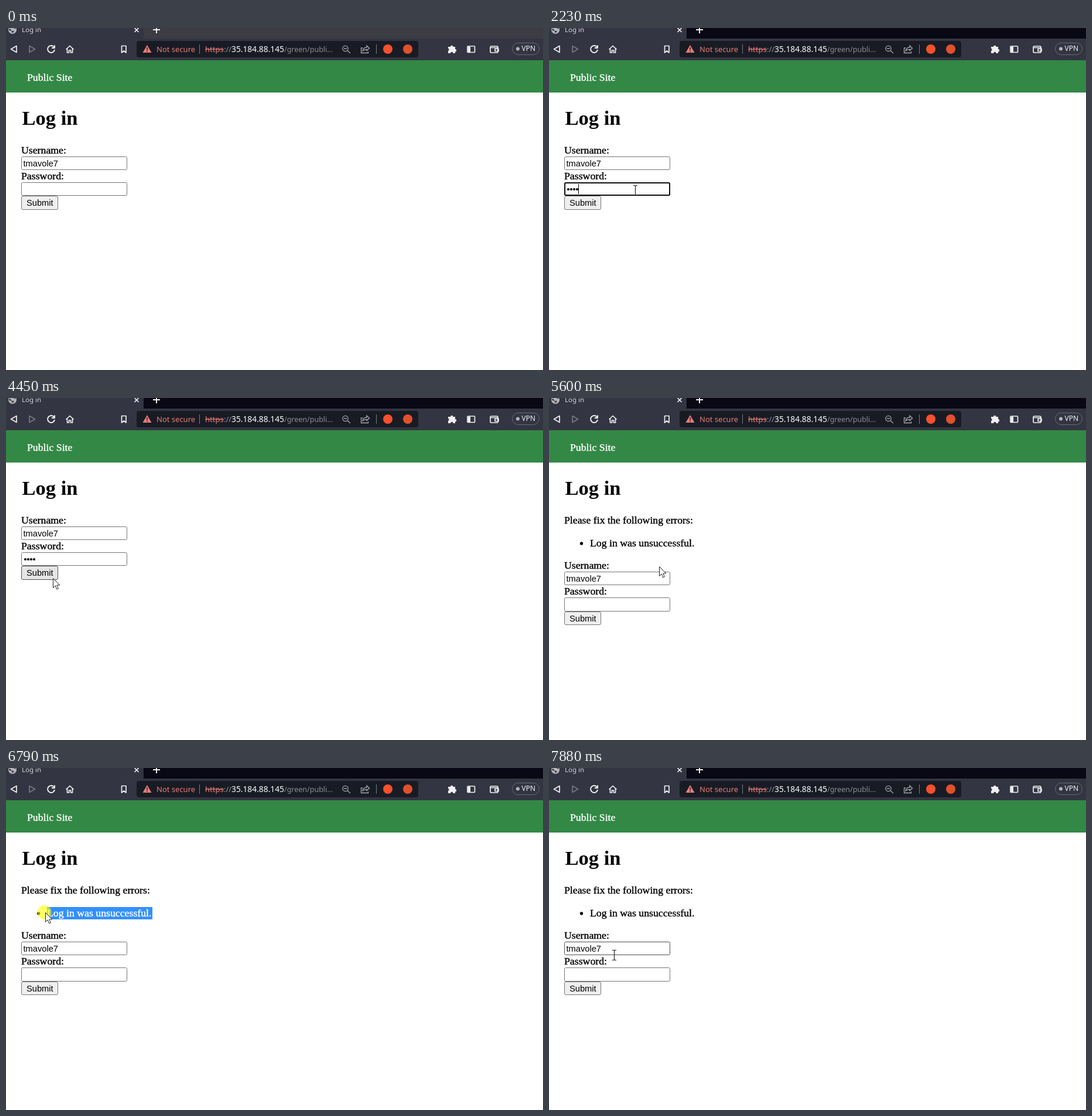
Animation, 917 px wide and 583 px high, one loop 8000 ms. Source, as an HTML page:

```html
<!DOCTYPE html>
<html lang="en">
<head>
<meta charset="utf-8">
<title>Log in</title>
<style>
  html, body { margin: 0; width: 100%; height: 100%; overflow: hidden; background: #fff; }
  svg { display: block; }
  text { white-space: pre; }
  .ui { font-family: "Noto Sans", sans-serif; font-size: 13px; }
  .page { font-family: "Liberation Serif", serif; font-size: 17.75px; stroke-width: .4px; }
  .dark { fill: #000; stroke: #000; }
  .light { fill: #fff; stroke: #fff; }
  .form { font-family: "Liberation Sans", sans-serif; font-size: 14.667px; }
  .field { fill: #fff; stroke: #767676; }
  .line { fill: none; stroke: #f0f0f3; stroke-width: 1.7; }
</style>
</head>
<body>
<svg width="917" height="583" viewBox="0 0 917 583">
  <defs>
    <clipPath id="selectionClip"><rect id="clipBox" y="237" height="21"/></clipPath>
  </defs>

  <!-- tab strip -->
  <rect id="strip" width="917" height="18"/>
  <path d="M0 0H235V18H0z" fill="#333542"/>
  <g id="globe">
    <circle cx="11" cy="3" r="7" fill="#b4b5ba"/>
    <path d="M5 1q3 0 4 2.500t4 1l.500 2-3 2-1-3.500-4-1zM12-3q0 4 4.500 4.500V-3z" fill="#333542"/>
  </g>
  <path id="spinner" d="M11-3A6 6 0 1 1 5 3" fill="none" stroke="#b4b5ba" stroke-width="2"/>
  <text class="ui" x="27" y="7" fill="#d5d6db" style="font-size:11.5px">Log in</text>
  <path class="line" d="M219.500 0l7 7m0-7l-7 7"/>
  <path class="line" d="M251 3h12M257-3v12" style="stroke-width:2"/>

  <!-- toolbar -->
  <rect y="18" width="917" height="37" fill="#333542"/>
  <g class="line" stroke-linejoin="round">
    <path d="M18 30.500L8.500 36 18 41.500z"/>
    <path d="M40 30.500L49.500 36 40 41.500z" stroke="#777985" style="stroke:#777985"/>
    <path d="M82 32.500A6 6 0 1 0 83 37M83 29.500v4.500h-5" stroke-width="2"/>
    <path d="M102.500 36.500L109 30.500l6.500 6M104.500 35v7h3v-4h3v4h3v-7"/>
    <path d="M197.500 30.500h7.500V42l-3.750-3-3.750 3z"/>
    <rect x="788" y="31" width="12.500" height="10.500" rx="1"/>
    <path d="M789 32h4v9h-4z" fill="#f0f0f3" stroke="none"/>
    <rect x="827" y="31" width="13" height="11" rx="2"/>
    <path d="M828 33.500h13M841 35.500h-6v4h6z"/>
  </g>
  <path d="M755 32h4a2.200 2.200 0 1 1 4.400 0H767v4a2.200 2.200 0 1 1 0 4.400V43h-3.500a2.200 2.200 0 0 0-4.400 0H755v-4a2.200 2.200 0 0 0 0-4.200z" fill="#f0f0f3"/>
  <rect x="223" y="22" width="481" height="28" rx="4" fill="#191b24"/>
  <path d="M241 29l7.500 13h-15z" fill="#e87e77"/>
  <path d="M241 33v4.500m0 1.300v1.700" stroke="#191b24" stroke-width="1.500"/>
  <g class="ui">
    <text x="257" y="41" fill="#e87e77">Not secure</text>
    <text x="340" y="41" fill="#e87e77">https</text>
    <path d="M340 36.500h32" stroke="#e87e77"/>
    <text x="372" y="41" fill="#9698a0">://</text>
    <text x="385" y="41" fill="#fff" style="font-size:13.800px">35.184.88.145</text>
    <text x="475" y="41" fill="#8c8e96" style="font-size:12.500px">/green/publi…</text>
    <rect x="864.500" y="25.500" width="46" height="20" rx="10" fill="none" stroke="#696b77"/>
    <circle cx="874" cy="35.500" r="3" fill="#b4b5ba"/>
    <text x="880.500" y="39" fill="#f0f0f3" style="font-size:12px">VPN</text>
  </g>
  <path d="M330.500 28v16M632.500 28v16" stroke="#7b7d86"/>
  <g class="line" style="stroke:#a5a7ae;stroke-width:1.300">
    <circle cx="579.500" cy="35" r="4.700"/>
    <path d="M583 38.500l5 4.500M577 35h5"/>
    <path d="M609 34h-2.500v8.500h12V40M609 39q1-6 7-6v-3l4.500 4.500-4.500 4V36.500q-4 0-7 2.500z"/>
  </g>
  <circle cx="652" cy="36" r="8" fill="#f4512c"/>
  <circle cx="686" cy="36" r="8" fill="#e2502c"/>

  <!-- page -->
  <rect y="55" width="917" height="55" fill="#338845"/>
  <text class="page light" x="36" y="90">Public Site</text>
  <text class="page dark" x="27.500" y="165" style="font-size:34.500px;font-weight:bold;stroke:none">Log in</text>

  <g id="errors">
    <text class="page dark" x="26" y="214">Please fix the following errors:</text>
    <circle cx="55.500" cy="248" r="2.700"/>
    <text class="page dark" x="70" y="253">Log in was unsuccessful.</text>
    <g id="selection" clip-path="url(#selectionClip)">
      <path d="M70 237H250V258H70z" fill="#3390ff"/>
      <text class="page light" x="70" y="253">Log in was unsuccessful.</text>
    </g>
  </g>

  <g id="form">
    <text class="page dark" x="26" y="214">Username:</text>
    <rect id="username" class="field" x="26.500" y="219.500" width="180" height="22" rx="2"/>
    <text class="form" x="29.500" y="236">tmavole7</text>
    <text class="page dark" x="26" y="258">Password:</text>
    <rect id="password" class="field" x="26.500" y="263.500" width="180" rx="2"/>
    <rect id="focus" x="27" y="264" width="179" height="21" rx="2" fill="none" stroke="#101010" stroke-width="2"/>
    <g id="dots"></g>
    <path id="caret" d="M.500 266v17" stroke="#000"/>
    <g id="submit">
      <rect id="button" x="26.500" y="286.500" width="62" rx="2.500"/>
      <text class="form" x="35" y="303">Submit</text>
    </g>
  </g>

  <!-- pointer -->
  <circle id="press" r="12" fill="#ff0" fill-opacity=".6"/>
  <path id="arrow" d="M.500.500V16.500l3.700-3.500 2.600 6 2.600-1.200-2.600-5.800h5z" fill="#fff" stroke="#222"/>
  <path id="beam" d="M-3.500-8.500h2.500l1 1 1-1h2.500M-3.500 8.500h2.500l1-1 1 1h2.500M0-7.500v15" fill="none" stroke="#222" stroke-width="1.200"/>
</svg>

<script>
const LOOP = 8000, STEP = 70;
const $ = id => document.getElementById(id);
const show = (id, on) => $(id).style.display = on ? '' : 'none';
const within = (t, spans) => spans.some(([from, to]) => t >= from && t < to);
const place = (id, x, y) => $(id).setAttribute('transform', `translate(${x} ${y})`);

const ACTIVATE = 550, BLUR = 3440, RELOAD = 5110, DRAG = 5880, DESELECT = 7070;
const keystrokes = [1360, 1560, 2030, 2230];
const presses = [[ACTIVATE, 690], [BLUR, 4180], [DRAG, 6860], [DESELECT, 7140]];
const caretOn = [[ACTIVATE, 1160], [1360, 2760], [3260, BLUR]];
// pointer path: time, x, y
const path = [
  [70, 250, 493], [420, 160, 300], [490, 147, 277],
  [2940, 147, 277], [3430, 82, 310], [3640, 82, 310], [3910, 81, 308],
  [4340, 81, 308], [4410, 80, 307], [4690, 80, 307], [4760, 80, 300],
  [5030, 80, 300], [5600, 188, 287], [5810, 250, 246], [5880, 250, 246],
  [6650, 67, 246], [6860, 67, 246], [7070, 150, 222], [7140, 150, 222],
  [7470, 118, 314], [7700, 114, 326], [7840, 111, 319], [LOOP, 111, 319]
];

function pointerAt(time) {
  const t = Math.max(path[0][0], Math.floor(time / STEP) * STEP);
  const i = path.findIndex(key => key[0] > t);
  const [t0, x0, y0] = path[i - 1], [t1, x1, y1] = path[i];
  const k = (t - t0) / (t1 - t0);
  return [Math.round(x0 + (x1 - x0) * k), Math.round(y0 + (y1 - y0) * k)];
}

$('dots').innerHTML = keystrokes.map((_, i) =>
  `<circle cx="${33 + 5 * i}" cy="275" r="2.100"/>`).join('');

function draw(t) {
  const [x, y] = pointerAt(t);
  const reloaded = t >= RELOAD;
  const focused = t >= ACTIVATE && t < BLUR;
  const pressed = within(t, presses);
  const loading = t >= 4710 && t < RELOAD;
  const typed = keystrokes.filter(k => t >= k).length;

  $('strip').setAttribute('fill', t < ACTIVATE ? '#3b3c44' : '#080914');
  show('globe', !loading);
  show('spinner', loading);
  $('spinner').setAttribute('transform', `rotate(${t * .4} 11 3)`);

  // the shifted form lands half a pixel lower, which rounds the lower rows by one
  const rounding = reloaded ? 1 : 0;
  show('errors', reloaded);
  place('form', 0, reloaded ? 77 : 0);
  place('submit', 0, rounding);
  $('password').setAttribute('height', 22 + rounding);
  $('button').setAttribute('height', 23 - rounding);
  show('focus', focused);
  show('dots', !reloaded);
  [...$('dots').children].forEach((dot, i) => dot.style.display = i < typed ? '' : 'none');
  show('caret', within(t, caretOn));
  place('caret', 30 + 5 * typed, 0);

  const overField = (top, bottom) => x >= 26 && x <= 207 && y >= top && y <= bottom;
  const overUser = reloaded && overField(296, 319);
  const overPassword = !reloaded && overField(263, 286);
  const overText = reloaded && x >= 70 && x < 250 && y >= 237 && y < 258;
  const overButton = !reloaded && x >= 26 && x <= 89 && y >= 286 && y <= 310;
  $('username').style.stroke = overUser ? '#4f4f4f' : '';
  const [fill, stroke] = !overButton ? ['#efefef', '#767676']
    : pressed ? ['#f5f5f5', '#8d8d8d'] : ['#e5e5e5', '#4f4f4f'];
  $('button').setAttribute('fill', fill);
  $('button').setAttribute('stroke', stroke);

  show('selection', t >= DRAG && t < DESELECT);
  const left = Math.max(70, t < 6650 ? x : 70);
  $('clipBox').setAttribute('x', left);
  $('clipBox').setAttribute('width', 250 - left);

  const beam = overUser || overPassword || overText;
  show('press', pressed);
  place('press', x - 1.5, y);
  show('beam', t >= 70 && beam);
  place('beam', x + .5, y);
  show('arrow', t >= 70 && !beam);
  place('arrow', x, y);
}

function frame() {
  draw(performance.now() % LOOP);
  requestAnimationFrame(frame);
}
frame();
</script>
</body>
</html>
```
